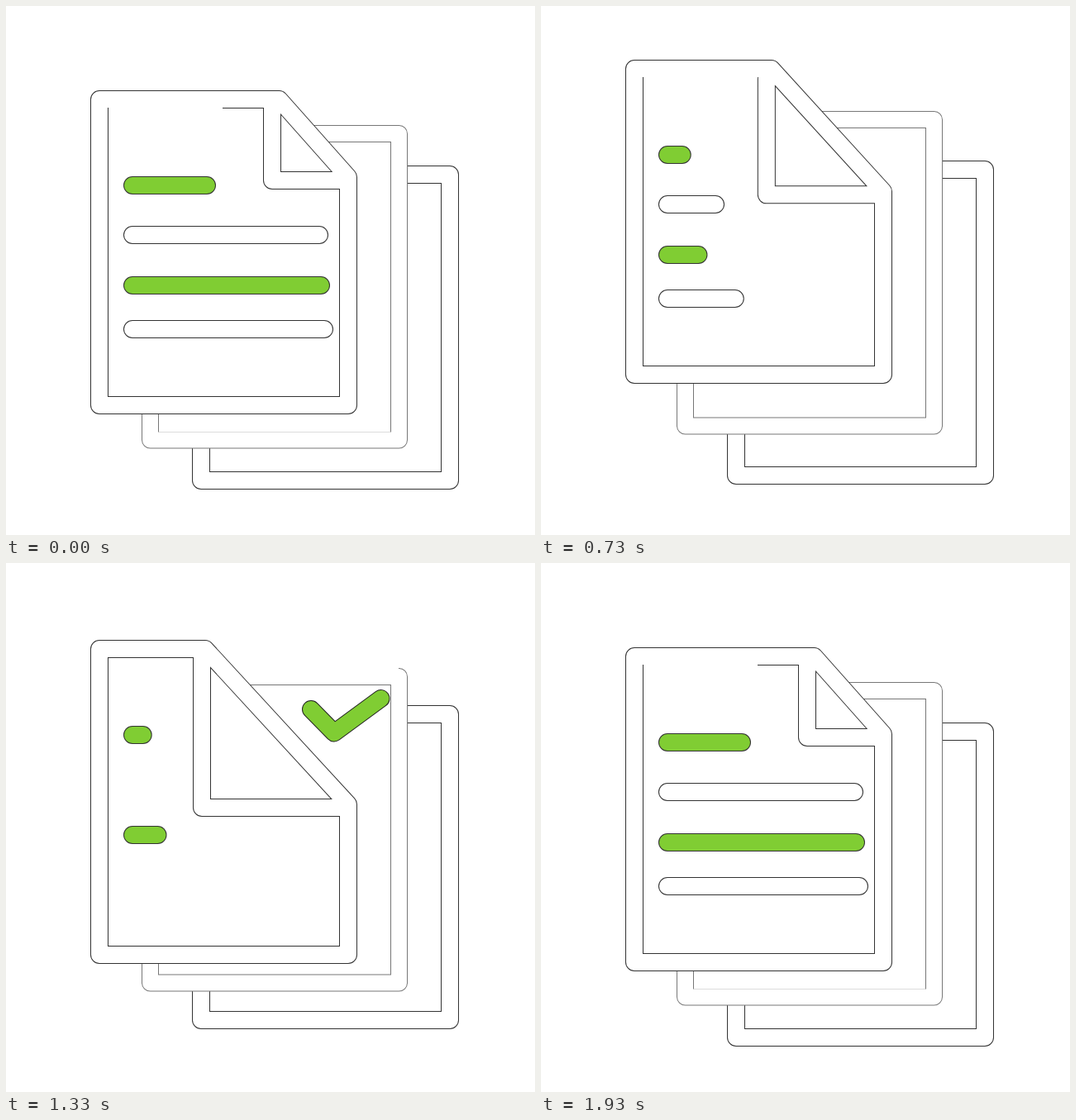
An HTML page that plays this animation: 640x640 px, repeating every 2.49 s.

```html
<!DOCTYPE html>
<html lang="en">
<head>
<meta charset="utf-8">
<title>Documents</title>
<style>
  html, body { margin: 0; width: 100%; height: 100%; overflow: hidden; background: #fff; }
  svg { display: block; width: 100vw; height: 100vh; }
  path { fill: none; stroke-linecap: round; stroke-linejoin: round; }
  .gap { stroke: #fff; stroke-width: 2; stroke-linecap: butt; }
</style>
</head>
<body>
<svg id="stage" viewBox="0 0 640 640"></svg>
<script>
const LOOP = 2490;
const GREEN = '#80cd33';
const stage = document.getElementById('stage');

function add(parent, tag, attrs = {}) {
  const node = document.createElementNS('http://www.w3.org/2000/svg', tag);
  for (const key in attrs) node.setAttribute(key, attrs[key]);
  return parent.appendChild(node);
}

// A thick line with a one pixel rim on both sides.
function rimmed(parent, color, rim, width = 22) {
  const outer = add(parent, 'path', { stroke: rim, 'stroke-width': width });
  const inner = add(parent, 'path', { stroke: color, 'stroke-width': width - 2 });
  return d => [outer, inner].forEach(p => p.setAttribute('d', d));
}

// Eased 0..1 between two times.
function ease(t, from, to) {
  const p = Math.min(1, Math.max(0, (t - from) / (to - from)));
  return (1 - Math.cos(Math.PI * p)) / 2;
}
const mix = (a, b, p) => a + (b - a) * p;

function makePage(rim, width) {
  const group = add(stage, 'g');
  const fill = add(group, 'path', { style: 'fill:#fff' });
  const line = rimmed(group, '#fff', rim, width);
  return {
    group,
    draw(body, extra = '') { fill.setAttribute('d', body); line(body + extra); },
    lift(y) { group.setAttribute('transform', `translate(0 ${-Math.round(y)})`); }
  };
}

const rect = (x1, y1, x2, y2) => `M${x1} ${y1}H${x2}V${y2}H${x1}Z`;

const back = makePage('#333');
back.draw(rect(236, 204, 537, 574));

const middle = makePage('#777', 21);
middle.draw(rect(174.5, 154.5, 475.5, 525));
const drawCheck = rimmed(middle.group, GREEN, '#222');

const front = makePage('#333');

// Rim pieces that fade into the white during part of the loop.
const gaps = [
  { page: front, d: 'M124 123.5H262', on: t => t < 1240 || t > 1740 },
  { page: front, d: 'M124 472.5H403', on: t => t > 760 && t < 1240 },
  { page: middle, d: 'M185 514.5H465', on: t => t < 690 || t > 1700 },
  { page: middle, d: 'M240 144.5H475', on: t => t > 1060 && t < 1430 }
].map(gap => ({ ...gap, node: add(gap.page.group, 'path', { class: 'gap', d: gap.d }) }));

const bars = [
  { y: 217, length: 90, color: GREEN, hide: [340, 893], show: [1177, 1805] },
  { y: 277, length: 226, color: '#fff', hide: [420, 890], show: [1380, 1840] },
  { y: 338, length: 228, color: GREEN, hide: [195, 925], show: [1238, 1628] },
  { y: 391, length: 232, color: '#fff', hide: [350, 990], show: [1335, 1690] }
].map(bar => ({ ...bar, draw: rimmed(front.group, bar.color, '#333') }));

const CHECK = [[369, 194], [397, 222.5], [453.5, 181]];
const leg = (a, b) => Math.hypot(b[0] - a[0], b[1] - a[1]);
const LEG1 = leg(CHECK[0], CHECK[1]);
const CHECK_LENGTH = LEG1 + leg(CHECK[1], CHECK[2]);

function checkPoint(s) {
  const first = s < LEG1;
  const [a, b] = first ? CHECK : CHECK.slice(1);
  const p = first ? s / LEG1 : (s - LEG1) / (CHECK_LENGTH - LEG1);
  return [mix(a[0], b[0], p), mix(a[1], b[1], p)];
}

function checkPath(from, to) {
  if (to - from < 0.002) return '';
  const s1 = from * CHECK_LENGTH, s2 = to * CHECK_LENGTH;
  const points = [checkPoint(s1)];
  if (s1 < LEG1 && s2 > LEG1) points.push(CHECK[1]);
  points.push(checkPoint(s2));
  return 'M' + points.join('L');
}

const bump = (t, height, up, down) => height * (ease(t, ...up) - ease(t, ...down));

function render(t) {
  front.lift(bump(t, 71, [513, 940], [960, 1440]));
  middle.lift(bump(t, 51, [565, 995], [1037, 1517]));
  back.lift(bump(t, 39, [620, 1055], [1080, 1600]));

  const fold = ease(t, 500, 920) - ease(t, 1463, 1893);
  const flapX = mix(322, 237, fold);
  const flapY = mix(211, 305, fold);
  const topEnd = mix(330.5, 241, fold);
  front.draw(
    `M113 113H${topEnd}L414 ${flapY - 4}V483H113Z`,
    `M${flapX} 113V${flapY}H414`
  );

  for (const bar of bars) {
    const part = 1 - ease(t, ...bar.hide) + ease(t, ...bar.show);
    bar.draw(part > 0.0005 ? `M153 ${bar.y}h${bar.length * part}` : '');
  }
  drawCheck(checkPath(ease(t, 1468, 1868), ease(t, 720, 1060)));

  for (const gap of gaps) gap.node.style.display = gap.on(t) ? '' : 'none';
}

function tick() {
  render(performance.now() % LOOP);
  requestAnimationFrame(tick);
}
tick();
</script>
</body>
</html>
```
